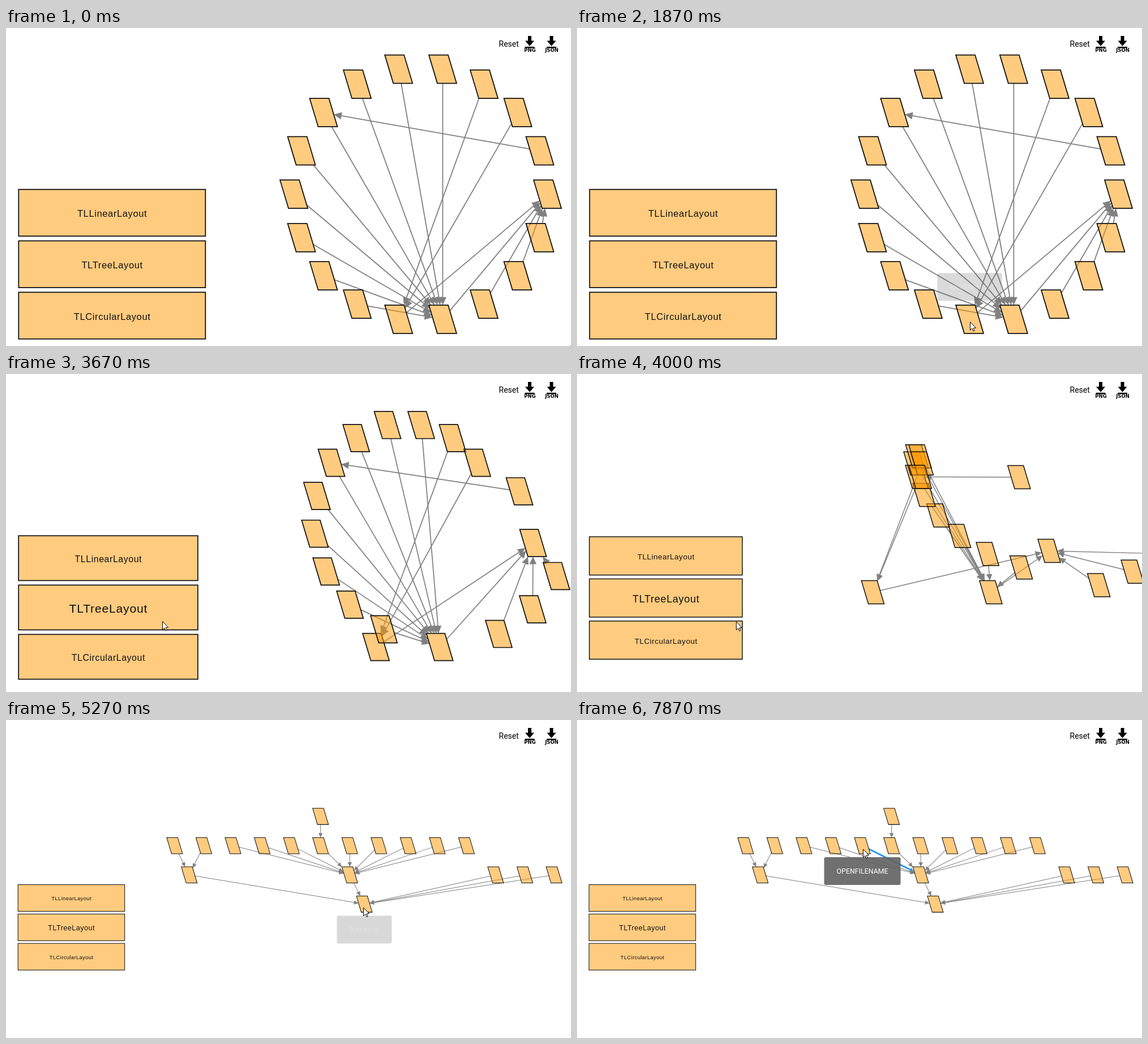
An HTML page with a canvas for the animation above (8000 ms loop, 998 by 561 pixels).

```html
<!DOCTYPE html>
<html lang="en">
<head>
<meta charset="utf-8">
<title>Graph layouts</title>
<style>
  html, body { margin: 0; width: 100%; height: 100%; overflow: hidden; background: #fff; }
  canvas { display: block; }
</style>
</head>
<body>
<canvas id="stage" width="998" height="561"></canvas>
<script>
const ctx = document.getElementById('stage').getContext('2d');
const W = 998, H = 561, LOOP = 8000, STEP = 200 / 3;
const GRAY = '#808080', ORANGE = '#ff9800', BLUE = '#2196f3';
const FILL = 'rgba(255,152,0,0.5)';

// Zooming keeps PIVOT in place; MORPH is when the circle becomes a tree.
const PIVOT = { x: 19.7, y: 298 }, TREE_ZOOM = 0.5712;
const MORPH = { start: 3571, length: 1015 };
const PRESS = 3400;

// Node half height, half width of a row, and slant.
const HALF_H = 25, HALF_W = 17, SLANT = 0.3;

const clamp = v => Math.max(0, Math.min(1, v));
const mix = (a, b, p) => a + (b - a) * p;

// Slot and level of each node in the tree; the root is level 0.
function treeSpot(i) {
  if (i === 0) return [6.5, 0];
  if (i <= 3) return [14 - i, 1];
  if (i === 4) return [6, 1];
  if (i === 5) return [0.5, 1];
  if (i === 17) return [5, 3];
  return [16 - i, 2];
}

const nodes = Array.from({ length: 18 }, (_, i) => {
  const angle = i * Math.PI / 9;
  const [slot, level] = treeSpot(i);
  return {
    circle: { x: 732.5 + 224 * Math.cos(angle), y: 293.2 + 224 * Math.sin(angle) },
    tree: { x: 506.7 + 90.25 * slot, y: 345 - 90.3 * level }
  };
});

function parentOf(i) {
  if (i <= 5) return 0;
  if (i <= 14) return 4;
  return i === 17 ? 11 : 5;
}
const edgeOrder = [4, 5, 3, 2, 1, 6, 7, 8, 9, 10, 11, 12, 13, 14, 15, 16, 17];

const hovers = [
  { node: 4, label: 'Alien', on: 560, off: 1370 },
  { node: 5, label: 'ExternalData', on: 1828, off: 2520 },
  { node: 0, label: 'ByteArray', on: 5226, off: 5830 },
  { node: 4, label: 'Alien', on: 6160, off: 6930 },
  { node: 3 + 9, label: 'OPENFILENAME', on: 7640, off: 9000 }
];

// Pointer stops: time, x, y.
const stops = [
  [0, 997, 560], [733, 755, 496], [867, 755, 495], [1230, 755, 495],
  [1500, 735, 544], [1830, 694, 518], [2430, 694, 518],
  [2667, 622, 544.5], [3267, 276, 436], [3960, 276, 436],
  [4400, 550, 470], [4740, 636, 506], [5180, 631, 330.5], [5700, 631, 330.5],
  [6220, 609, 270], [6760, 609, 270], [7600, 505, 227.5], [8000, 505, 227.5]
];

function slope(i, axis) {
  const before = stops[i - 1], here = stops[i], after = stops[i + 1];
  if (!before || !after) return 0;
  const still = s => Math.hypot(s[1] - here[1], s[2] - here[2]) < 2;
  if (still(before) || still(after)) return 0;
  return (after[axis] - before[axis]) / (after[0] - before[0]);
}

function pointerAt(t) {
  let i = 0;
  while (i < stops.length - 2 && t >= stops[i + 1][0]) i++;
  const a = stops[i], b = stops[i + 1], span = b[0] - a[0];
  const u = clamp((t - a[0]) / span), v = 1 - u;
  const along = axis =>
    a[axis] * (1 + 2 * u) * v * v + b[axis] * u * u * (3 - 2 * u) +
    span * u * v * (slope(i, axis) * v - slope(i + 1, axis) * u);
  return { x: along(1), y: along(2) };
}

function polygon(points) {
  ctx.beginPath();
  points.forEach(([x, y]) => ctx.lineTo(x, y));
  ctx.closePath();
}

function text(label, x, y, font, color, align = 'center', spacing = 0) {
  ctx.font = font;
  ctx.fillStyle = color;
  ctx.textAlign = align;
  ctx.letterSpacing = spacing + 'px';
  ctx.fillText(label, x, y);
  ctx.letterSpacing = '0px';
}

// Distance from a node's centre to its outline along a unit direction.
const reach = (dx, dy) => Math.min(
  HALF_H / Math.max(1e-6, Math.abs(dy)),
  HALF_W / Math.max(1e-6, Math.abs(dx - SLANT * dy)));

function drawEdge(a, b, color, width) {
  const length = Math.hypot(b.x - a.x, b.y - a.y);
  const dx = (b.x - a.x) / length, dy = (b.y - a.y) / length;
  const r = reach(dx, dy), head = 14, wing = 6.5;
  const tipX = b.x - dx * r, tipY = b.y - dy * r;
  const baseX = tipX - dx * head, baseY = tipY - dy * head;
  ctx.strokeStyle = ctx.fillStyle = color;
  ctx.lineWidth = width;
  if (length > 2 * r + head) {
    ctx.beginPath();
    ctx.moveTo(a.x + dx * r, a.y + dy * r);
    ctx.lineTo(baseX, baseY);
    ctx.stroke();
  }
  polygon([[tipX, tipY], [baseX - dy * wing, baseY + dx * wing],
           [baseX + dy * wing, baseY - dx * wing]]);
  ctx.fill();
}

function drawNode({ x, y }) {
  const lean = SLANT * HALF_H;
  polygon([
    [x - HALF_W - lean, y - HALF_H], [x + HALF_W - lean, y - HALF_H],
    [x + HALF_W + lean, y + HALF_H], [x - HALF_W + lean, y + HALF_H]
  ]);
  ctx.fillStyle = FILL;
  ctx.fill();
  ctx.strokeStyle = '#111';
  ctx.lineWidth = 1.8;
  ctx.stroke();
}

function drawButtons(t) {
  ['TLLinearLayout', 'TLTreeLayout', 'TLCircularLayout'].forEach((label, i) => {
    const top = 284.8 + 90.7 * i;
    ctx.fillStyle = FILL;
    ctx.fillRect(22.3, top, 330, 82.4);
    ctx.strokeStyle = '#111';
    ctx.lineWidth = 1.8;
    ctx.strokeRect(22.3, top, 330, 82.4);
    const size = i === 1 && t >= PRESS ? 22 : 16.5;
    text(label, 187.6, top + 43 + size * 0.34,
      size + 'px "Liberation Sans", Arial, sans-serif', '#111', 'center', size * 0.038);
  });
}

function drawTooltip(hover, place, zoom, t) {
  const alpha = Math.min(clamp((t - hover.on) / 150), clamp(1 - (t - hover.off) / 75));
  if (alpha <= 0) return;
  const x = PIVOT.x + (place.x - PIVOT.x) * zoom;
  const nodeY = PIVOT.y + (place.y - PIVOT.y) * zoom;
  const gap = HALF_H * zoom + 31;
  const y = nodeY + gap + 25 > H ? nodeY - gap - 1 : nodeY + gap - 0.5;
  const font = '12.4px Roboto, sans-serif';
  ctx.font = font;
  const width = ctx.measureText(hover.label).width + 44;
  ctx.globalAlpha = alpha;
  ctx.fillStyle = 'rgba(97,97,97,0.9)';
  ctx.beginPath();
  ctx.roundRect(x - width / 2, y - 24.5, width, 49, 3);
  ctx.fill();
  text(hover.label, x, y + 4.5, font, '#fff');
  ctx.globalAlpha = 1;
}

function drawDownload(x, label) {
  ctx.fillStyle = '#000';
  ctx.fillRect(x - 3, 14, 6, 9);
  polygon([[x - 8, 22.5], [x + 8, 22.5], [x, 32]]);
  ctx.fill();
  ctx.fillRect(x - 8.5, 33, 17, 2.2);
  text(label, x + 0.5, 42, 'bold 8.5px "DejaVu Sans", sans-serif', '#000');
}

function drawPointer({ x, y }) {
  ctx.save();
  ctx.translate(x + 0.5, y + 0.5);
  polygon([[0, 0], [0, 14.5], [3.3, 11.4], [5.5, 16.4], [7.7, 15.5], [5.6, 10.7], [10, 10.5]]);
  ctx.fillStyle = '#fff';
  ctx.fill();
  ctx.strokeStyle = '#000';
  ctx.lineWidth = 1;
  ctx.stroke();
  ctx.restore();
}

function draw(t) {
  const p = clamp((t - MORPH.start) / MORPH.length);
  const zoom = mix(1, TREE_ZOOM, p);
  const places = nodes.map(({ circle, tree }) =>
    ({ x: mix(circle.x, tree.x, p), y: mix(circle.y, tree.y, p) }));
  const active = hovers.find(h => t >= h.on + 170 && t < h.off + 60);

  ctx.fillStyle = '#fff';
  ctx.fillRect(0, 0, W, H);

  ctx.save();
  ctx.translate(PIVOT.x, PIVOT.y);
  ctx.scale(zoom, zoom);
  ctx.translate(-PIVOT.x, -PIVOT.y);
  edgeOrder.forEach(from => {
    const to = parentOf(from);
    const color = active && active.node === from ? BLUE
      : active && active.node === to ? ORANGE : GRAY;
    drawEdge(places[from], places[to], color, color === GRAY ? 1.8 : 5);
  });
  places.forEach(drawNode);
  drawButtons(t);
  ctx.restore();

  text('Reset', 870.5, 33, '14px Roboto, sans-serif', '#000', 'left');
  drawDownload(925, 'PNG');
  drawDownload(963.5, 'JSON');
  hovers.forEach(h => drawTooltip(h, places[h.node], zoom, t));
  drawPointer(pointerAt(t));
}

const begin = performance.now();
function tick() {
  const t = (performance.now() - begin) % LOOP;
  // The picture is refreshed fifteen times a second.
  draw(Math.floor((t + 4) / STEP) * STEP);
  requestAnimationFrame(tick);
}
tick();
</script>
</body>
</html>
```
